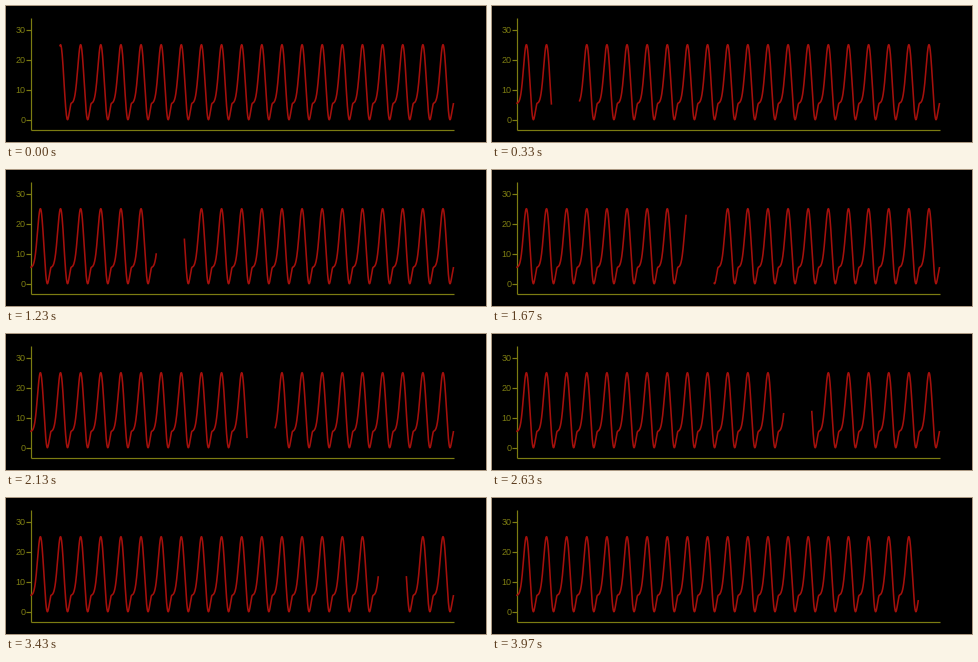
Animation of 480 by 136 pixels, one loop 4.01 s. Source, as a matplotlib script:

```python
import numpy as np
import matplotlib.pyplot as plt
from matplotlib.animation import FuncAnimation

W, H, DPI = 480, 136, 100
PX = 72 / DPI                      # one pixel in points
LEFT, BASE, RIGHT = 24.5, 123.5, 447.5
ZERO, UNIT = 113.7, 3.0
PERIOD, FIRST_PEAK, FALL = 20.13, 34.4, 7.0
SWEEP_START, STEP, GAP = 25.9, 3.364, 28.0
PEAK, FILLED = 25.0, 5.4
AXIS, TRACE = "#7c7c12", "#a4100c"


def smoothstep(t):
    t = np.clip(t, 0, 1)
    return t * t * (3 - 2 * t)


def pressure(x):
    """Cosine relaxation, then filling plus a bell-shaped contraction."""
    d = (x - FIRST_PEAK) % PERIOD
    relax = PEAK * (1 + np.cos(np.pi * d / FALL)) / 2
    fill = FILLED * smoothstep((d - FALL) / 3.8)
    squeeze = (PEAK - FILLED) * np.exp(-((PERIOD - d) / 2.9) ** 2 / 2)
    return np.where(d < FALL, relax, fill + squeeze)


fig = plt.figure(figsize=(W / DPI, H / DPI), dpi=DPI, facecolor="black")
ax = fig.add_axes([0, 0, 1, 1])
ax.set(xlim=(0, W), ylim=(H, 0))
ax.axis("off")


def rule(xs, ys):
    ax.plot(xs, ys, color=AXIS, lw=1.2 * PX, solid_capstyle="butt")


rule([LEFT, LEFT], [11.5, BASE])
rule([LEFT, RIGHT], [BASE, BASE])
for value in range(0, 31, 10):
    y = 113.5 - UNIT * value
    rule([LEFT - 4.5, LEFT], [y, y])
    ax.text(19.2, y, str(value), color=AXIS, family="Liberation Sans",
            size=9 * PX, ha="right", va="center_baseline")

x = np.arange(LEFT + 0.5, RIGHT, 0.2)
wave = ZERO - UNIT * pressure(x)
trace, = ax.plot([], [], color=TRACE, lw=1.6 * PX, solid_joinstyle="round")


def update(tick):
    # 10 ms ticks, the sweep advances about 30 times a second
    step = (3 * tick + 1) // 10
    head = SWEEP_START + STEP * step
    hidden = (x > head) & (x < head + GAP)
    if step == 0:
        hidden |= x <= head
    trace.set_data(x, np.where(hidden, np.nan, wave))
    return trace,


anim = FuncAnimation(fig, update, frames=401, interval=10,
                     repeat=True, repeat_delay=0, blit=False)
plt.show()
```
